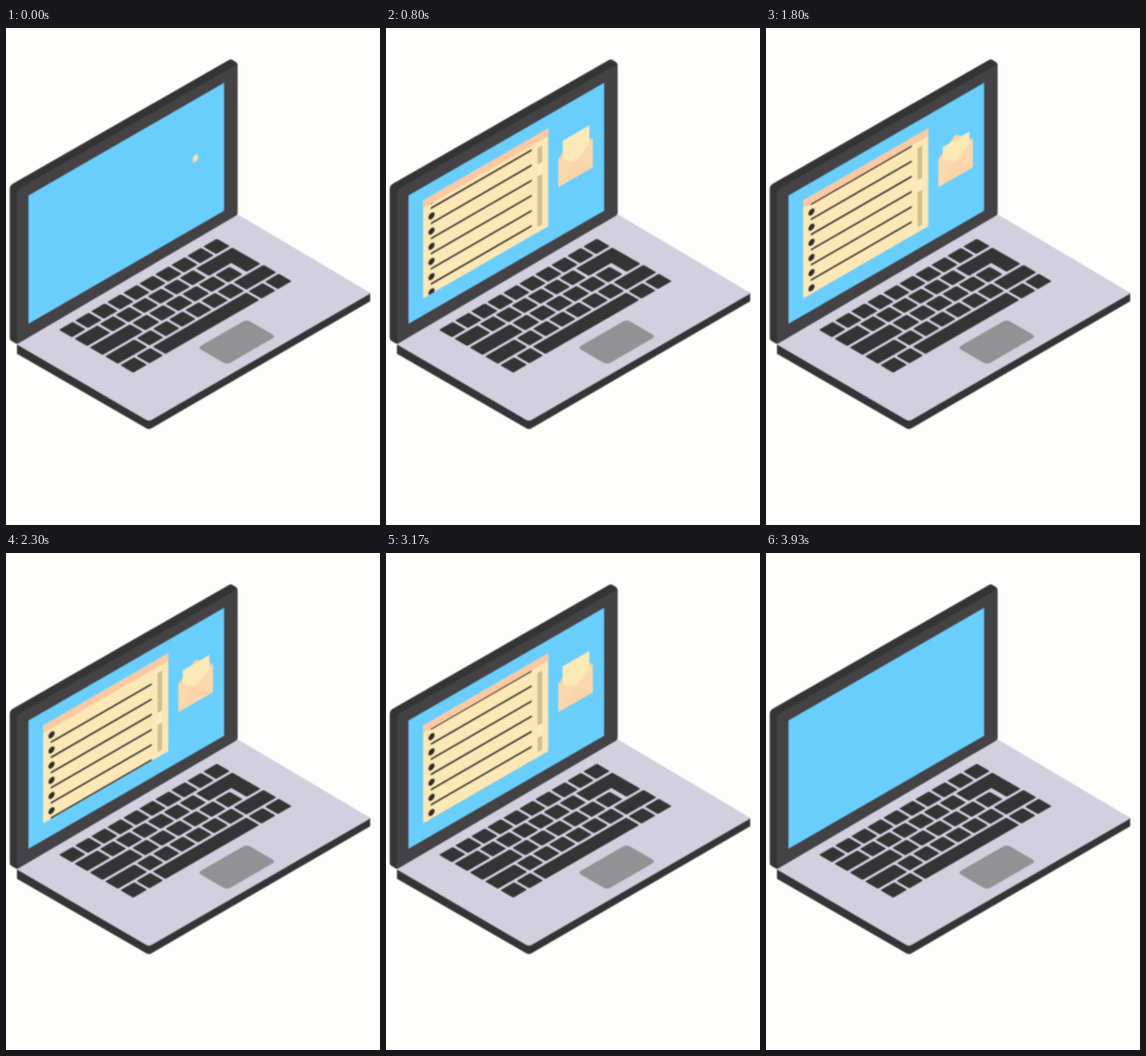
An HTML page for the animation above (3.96 s loop, 649x862 px).

```html
<!DOCTYPE html>
<html lang="en">
<head>
<meta charset="utf-8">
<title>Laptop</title>
<style>
  html, body { margin: 0; height: 100%; overflow: hidden; background: #fdfdfc; }
  svg { display: block; width: 100%; height: 100%; filter: blur(.8px); }
</style>
</head>
<body>
<svg viewBox="0 0 649 862">
  <defs>
    <clipPath id="page"><rect y="13.500" width="217" height="156.5"/></clipPath>
  </defs>

  <!-- base -->
  <path fill="#343435" d="M19 549V565L243 694Q248 697 253 694L632 474V460L407 400Z"/>
  <path fill="#d2cfde" d="M19 549V543L400 322L412 329L628 457Q634 460 628 463L254 679Q248 683 242 679Z"/>
  <g id="keys" fill="#343435" transform="matrix(1 -.577 1 .577 92 523.500)"/>
  <rect fill="#929294" width="85" height="51" rx="6" transform="matrix(1 -.577 1 .577 332.500 554.500)"/>

  <!-- lid -->
  <path fill="#343435" d="M6.500 279Q6.500 273 12 270L385 56.500Q390 53 394 56L399 59Q402 61 402 66V319Q402 324 398 326L23 546Q19 549 15 546L10 543Q6.500 541 6.500 537Z"/>
  <path fill="#444244" d="M19 287Q19 281 24 278L396 66Q402 63 402 69V319Q402 324 398 326L24 545Q19 548 19 542Z"/>
  <path fill="#69cefc" d="M39 290.500L378.500 95V317L39 513Z"/>

  <!-- list window -->
  <g transform="matrix(1 -.577 0 1 64.500 299)">
    <g id="win">
      <rect width="217" height="170" fill="#fbe8b6"/>
      <rect width="217" height="13.500" fill="#fac9a2"/>
      <g clip-path="url(#page)"><g id="list"/></g>
      <rect x="198.500" y="24" width="8" height="137" fill="#d0be92"/>
      <rect id="thumb" x="198.500" width="8" height="21" fill="#fcecc2"/>
    </g>
  </g>

  <!-- envelope -->
  <g transform="matrix(1 -.577 0 1 299 227)">
    <g id="mail">
      <path fill="#f9cda0" d="M0 0L27 -22.500Q30 -26 33 -22.500L60 0V30H0Z"/>
      <rect id="paper" x="7.500" y="-27" width="46.500" height="55" fill="#fbe9b6"/>
      <path fill="#fbd8ae" d="M0 0L25 18.500Q30 23 35 18.500L60 0V49H0Z"/>
      <path fill="#fad5a9" d="M0 49L26 22Q30 18 34 22L60 49Z"/>
    </g>
  </g>
</svg>
<script>
const $ = id => document.getElementById(id);
const LOOP = 3960, PITCH = 26.3;

function add(parent, tag, attrs) {
  const el = document.createElementNS('http://www.w3.org/2000/svg', tag);
  for (const k in attrs) el.setAttribute(k, attrs[k]);
  parent.append(el);
}

// Keyboard: each row is a list of key edges along the row
const run = (from, step, n) => Array.from({ length: n + 1 }, (_, i) => from + i * step);
const rows = [
  run(0, 27.8, 10),
  [0, ...run(44, 27.7, 6)],
  [0, ...run(74, 28.8, 6)],
  [0, ...run(55, 28, 6), 279],
  [0, 28, 56, 222.5, 251, 279]
];
rows.forEach((edges, r) => edges.slice(1).forEach((end, i) =>
  add($('keys'), 'rect', { x: edges[i], y: r * 26.6, width: end - edges[i] - 4, height: 22.4, rx: 2 })));
add($('keys'), 'path', { d: 'M213 26.600H272Q274 26.600 274 28.600V73.600Q274 75.600 272 75.600H252Q250 75.600 250 73.600V49H213Q211 49 211 47V28.600Q211 26.600 213 26.600Z' });

for (let i = -1; i < 8; i++) {
  const y = i * PITCH;
  add($('list'), 'circle', { cx: 14.5, cy: y, r: 5.4, fill: '#302c2b' });
  add($('list'), 'path', { d: `M14.500 ${y + 12.3}H187`, stroke: '#443a33', 'stroke-width': 3.3, 'stroke-linecap': 'round' });
}

// Linear interpolation through [time, value] points
function track(t, points) {
  const i = points.findIndex(p => p[0] > t);
  if (i < 0) return points[points.length - 1][1];
  if (!i) return points[0][1];
  const [t0, a] = points[i - 1], [t1, b] = points[i];
  return a + (b - a) * (t - t0) / (t1 - t0);
}

const clamp = x => Math.min(1, Math.max(0, x));
const easeOut = x => 1 - (1 - clamp(x)) ** 2;
const pop = (t, start, end) => easeOut((t - start) / 400) * easeOut((end - t) / 400);

function scaleAt(el, s, x, y) {
  el.setAttribute('transform', `translate(${x} ${y}) scale(${s}) translate(${-x} ${-y})`);
  el.style.display = s > 0 ? '' : 'none';
}

const scrollPath = [[200, -33], [800, 0], [1370, 31.8], [1800, 59.4], [2300, 89.5], [3170, 138.9], [3930, 180]];
const paperPath = [[800, 0], [1370, 4], [1800, 11], [2300, 8], [3170, 1], [3600, 0]];

function draw(now) {
  const t = now % LOOP;
  const scroll = track(t, scrollPath);
  const shift = (((35.4 - scroll) % PITCH) + PITCH) % PITCH;
  $('list').setAttribute('transform', `translate(0 ${shift})`);
  $('thumb').setAttribute('y', 52.3 + scroll * 0.454);
  $('paper').setAttribute('y', -27 + track(t, paperPath));
  scaleAt($('mail'), pop(t, -30, 3920), 29.5, 17);
  scaleAt($('win'), pop(t, 150, 3860), 108.5, 85);
}

const start = performance.now();
function tick() {
  draw(performance.now() - start);
  requestAnimationFrame(tick);
}
tick();
</script>
</body>
</html>
```
